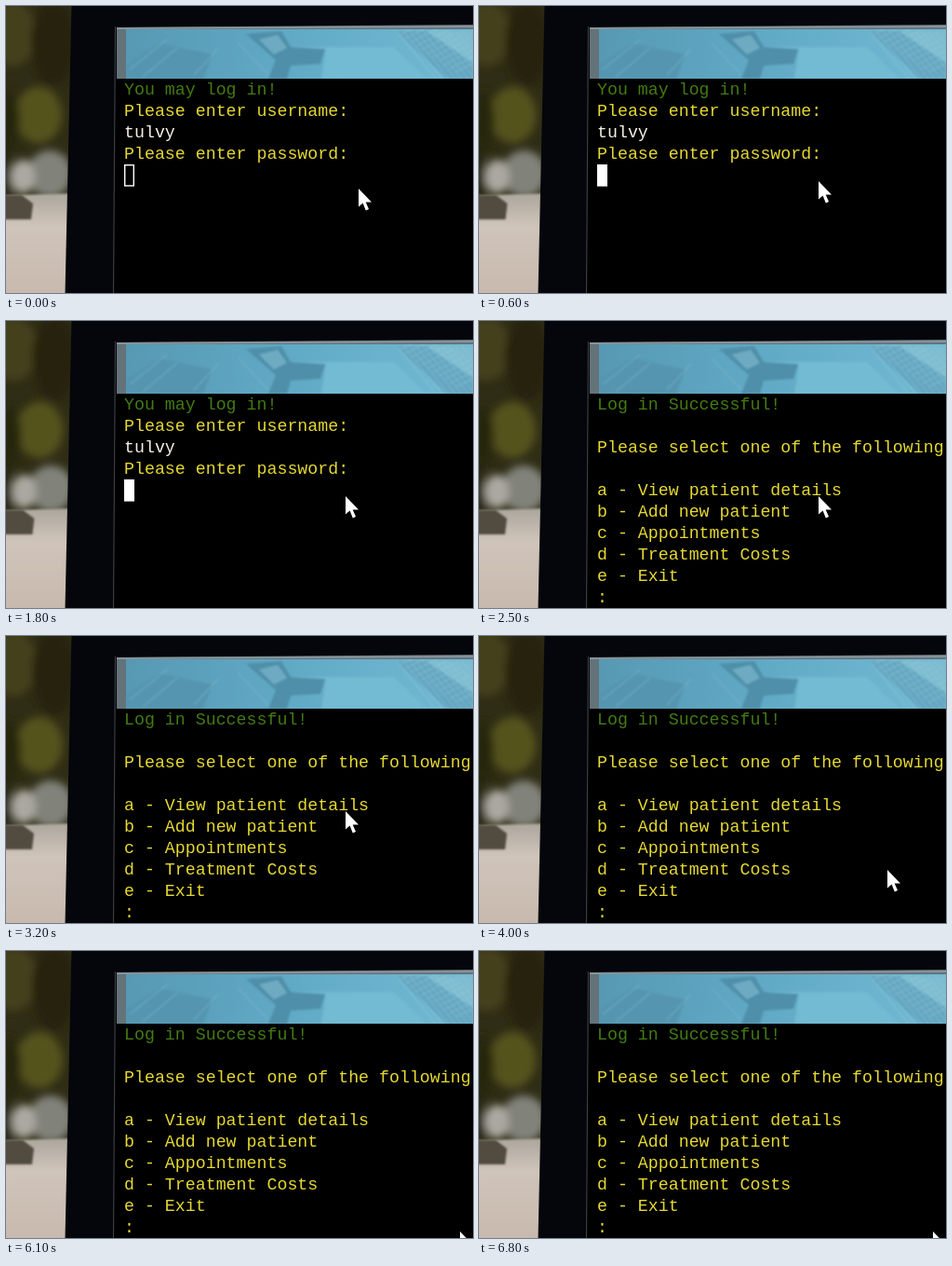
These frames come from a looping animation (502x308 px, 7.2 s). An HTML page:

```html
<!DOCTYPE html>
<html lang="en">
<head>
<meta charset="utf-8">
<title>Terminal log in</title>
<style>
html, body { margin: 0; width: 100%; height: 100%; overflow: hidden; background: #000 }
svg { display: block; width: 502px; height: 308px }
text { font: 18.28px "Liberation Mono", "Courier New", monospace; fill: #e5d832 }
.ok { fill: #437b12 }
.user { fill: #f4f0e4 }
</style>
</head>
<body>
<svg viewBox="0 0 502 308">
  <defs>
    <filter id="soft" x="-30%" y="-30%" width="160%" height="160%"><feGaussianBlur stdDeviation="4"/></filter>
    <filter id="slight"><feGaussianBlur stdDeviation="1"/></filter>
    <linearGradient id="sky" x2="1" y2="0">
      <stop stop-color="#5799b3"/><stop offset=".45" stop-color="#60a9c5"/><stop offset="1" stop-color="#72bad3"/>
    </linearGradient>
    <linearGradient id="ground" x2="0" y2="1">
      <stop stop-color="#aaa59c"/><stop offset=".28" stop-color="#cfc4ba"/><stop offset="1" stop-color="#c6b6aa"/>
    </linearGradient>
    <clipPath id="banner"><path d="M129 25H502V78H129z"/></clipPath>
  </defs>

  <!-- blurred garden -->
  <g id="garden">
    <path d="M-30-20H110V215H-30z" fill="#2f2d15"/>
    <g filter="url(#soft)">
      <ellipse cx="8" cy="30" rx="26" ry="34" fill="#45411d"/>
      <ellipse cx="52" cy="40" rx="24" ry="46" fill="#252411"/>
      <ellipse cx="36" cy="117" rx="25" ry="30" fill="#55521f"/>
      <ellipse cx="4" cy="125" rx="12" ry="34" fill="#27260f"/>
      <ellipse cx="48" cy="180" rx="24" ry="25" fill="#81827a"/>
      <ellipse cx="19" cy="183" rx="13" ry="18" fill="#aaa8a0"/>
      <path d="M-20 150L4 158 8 206H-20z" fill="#2b2918"/>
    </g>
    <path d="M-30 204L110 200V330H-30z" fill="url(#ground)" filter="url(#slight)"/>
    <path d="M-30 203H18L30 212 28 229H-30z" fill="#514c40" filter="url(#slight)"/>
  </g>

  <!-- monitor -->
  <path d="M70.5-2L63.5 310H504V-2z" fill="#05060b"/>
  <path d="M117 78H502V308H115z"/>
  <path d="M117.5 22L115.5 308" stroke="#3c3d42" stroke-width="1.2"/>
  <path d="M119 23L502 20V78H119z" fill="#64727a"/>
  <path d="M119 24L502 22" stroke="#87959c" stroke-width="2"/>
  <g clip-path="url(#banner)">
    <path d="M129 25H502V78H129z" fill="url(#sky)"/>
    <g filter="url(#slight)">
      <path d="M129 62L165 40 222 52 212 78H129z" fill="#5595b0"/>
      <path d="M258 30L296 27 306 44 343 46 338 62 306 64 302 78H282L290 58z" fill="#4f8fa9"/>
      <path d="M272 36L292 31 302 45 288 52z" fill="#6eabc2"/>
      <path d="M306 44H417L452 78H339L344 46z" fill="#73bad3"/>
      <path d="M419 27H502V78H474z" fill="#63a6c1"/>
      <path d="M452 27H502V61z" fill="#7dbcd1"/>
      <path id="facade" stroke="#a7d4df" opacity=".45"/>
      <path d="M133 68L173 36M147 76L184 45M202 74L228 46M250 40L282 74" stroke="#83b9cb" stroke-width="1.2" opacity=".5"/>
    </g>
  </g>

  <g id="login"></g>
  <g id="menu"></g>
  <rect id="caret" x="127.7" y="170.7" width="9.6" height="22.2" stroke="#fff" stroke-width="1.4"/>
  <path id="mouse" d="M0 0V19.5L4.6 15.4 7.8 23.4 11 22 7.7 14.4H14z" fill="#fff"/>
</svg>
<script>
const LOOP = 7200, STEP = 100;
const $ = id => document.getElementById(id);

const line = (row, text, cls = "") =>
  `<text class="${cls}" x="127" y="${95 + row * 23}">${text}</text>`;

$("login").innerHTML =
  line(0, "You may log in!", "ok") +
  line(1, "Please enter username:") +
  line(2, "tulvy", "user") +
  line(3, "Please enter password:");

$("menu").innerHTML =
  line(0, "Log in Successful!", "ok") +
  line(2, "Please select one of the following") +
  ["a - View patient details", "b - Add new patient", "c - Appointments",
   "d - Treatment Costs", "e - Exit", ":"].map((s, i) => line(4 + i, s)).join("");

// Window rows of the tower in the banner
let rows = "";
for (let i = 0; i < 11; i++) rows += `M${420 + i * 7} 27l42 51M${423 + i * 6} ${31 + i * 4}l34 -17`;
$("facade").setAttribute("d", rows);

// Keys are [time, value, value, ...]
function track(keys, t) {
  const i = keys.findIndex(k => k[0] > t);
  if (i < 0) return keys[keys.length - 1].slice(1);
  const [a, b] = [keys[i - 1], keys[i]];
  const p = (t - a[0]) / (b[0] - a[0]);
  return a.slice(1).map((v, j) => v + (b[j + 1] - v) * p);
}

const mousePath = [[0, 379, 196], [500, 365, 188], [3600, 365, 188], [4000, 439, 251],
  [4400, 442, 297], [4700, 488, 301]];
const gardenPath = [[0, -1], [800, 1], [2500, 0]];

function draw(now) {
  const t = Math.floor(now % LOOP / STEP) * STEP;
  const show = (id, on) => $(id).style.display = on ? "" : "none";
  $("garden").setAttribute("transform", `translate(${track(gardenPath, t)})`);
  $("mouse").setAttribute("transform", `translate(${track(mousePath, t)})`);
  show("login", t < 2300);
  show("caret", t < 2300);
  show("menu", t >= 2500);
  $("caret").setAttribute("fill", t < 500 ? "#000" : "#fff");
}

const start = performance.now();
function tick() {
  draw(performance.now() - start);
  requestAnimationFrame(tick);
}
tick();
</script>
</body>
</html>
```
